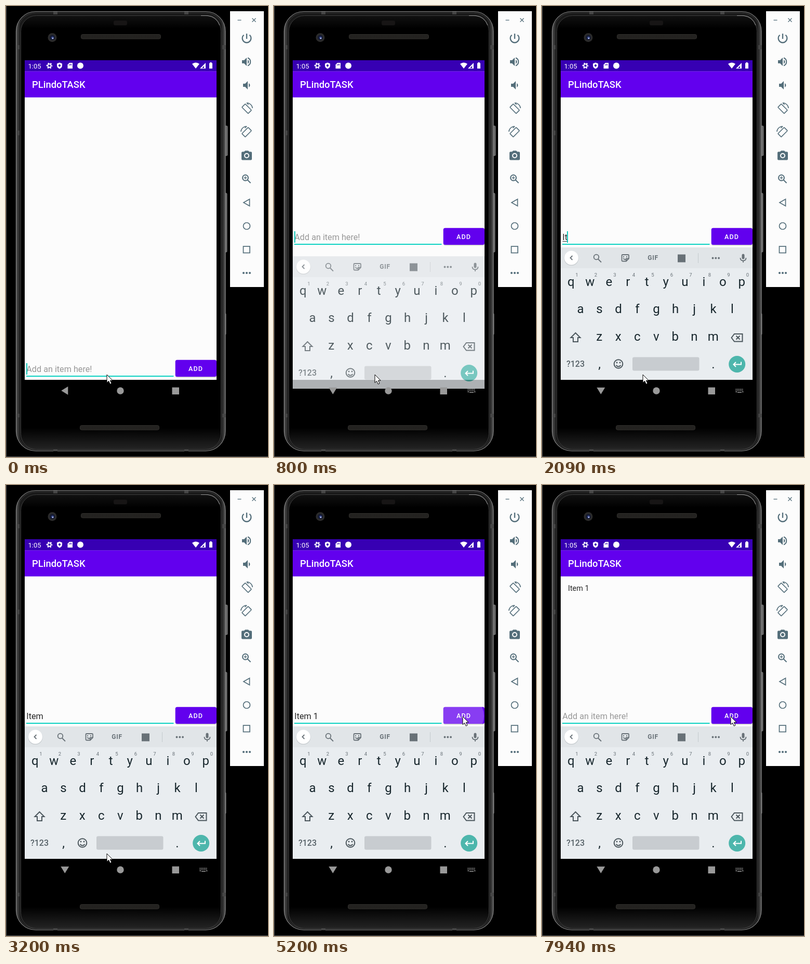
Recreate the animation shown at these times as an HTML page. Size 504 by 865 pixels, loop 8000 ms.

```html
<!DOCTYPE html>
<html lang="en">
<head>
<meta charset="utf-8">
<title>To-do app demo</title>
<style>
html, body { margin: 0; width: 100%; height: 100%; overflow: hidden; background: #000; }
svg { display: block; width: 504px; height: 865px; font-family: Roboto, sans-serif; }
text { white-space: pre; }
.mid { text-anchor: middle; }
.line { fill: none; stroke-width: 2; }
#panel { fill: #546e7a; stroke: #546e7a; stroke-width: 0; }
#panel .line { fill: none; stroke-width: 2; }
#strip { fill: #687177; stroke: #687177; stroke-width: 0; }
#strip .line { fill: none; stroke-width: 1.8; }
</style>
</head>
<body>
<svg viewBox="0 0 504 865">
  <defs>
    <linearGradient id="face" x2="0" y2="1">
      <stop offset="0" stop-color="#111"/><stop offset=".03"/><stop offset=".95"/><stop offset="1" stop-color="#242424"/>
    </linearGradient>
    <linearGradient id="rim">
      <stop offset="0" stop-color="#555"/><stop offset=".02" stop-color="#191919"/>
      <stop offset=".98" stop-color="#191919"/><stop offset="1" stop-color="#555"/>
    </linearGradient>
    <pattern id="mesh" width="3" height="3" patternUnits="userSpaceOnUse">
      <path d="M0 0h3v3h-3z" fill="#1c1b19"/><path d="M0 0h1v1h-1zM1.5 1.5h1v1h-1z" fill="#3b3936"/>
    </pattern>
    <clipPath id="btnClip"><rect x="325.700" y="678.700" width="79.300" height="32.300" rx="3.500"/></clipPath>
    <g id="turn">
      <rect x="-4.500" y="-8.500" width="9" height="17" rx=".8" transform="rotate(-45)"/>
      <path d="M0-11.200A11.200 11.200 0 0 1 11.200-1M0-11.200l3.500 3.500"/>
    </g>
  </defs>

  <rect width="504" height="865"/>
  <path d="M.5 0V864.500H504" fill="none" stroke="#5c5c5c"/>

  <!-- phone body -->
  <g fill="#666" stroke="#909090" stroke-width=".8">
    <rect x="419" y="230" width="7" height="57" rx="1.500"/>
    <rect x="418" y="359" width="7" height="113" rx="1.500"/>
    <rect x="418" y="590" width="5" height="40" rx="1"/>
  </g>
  <rect x="19.500" y="10.500" width="402.500" height="843" rx="38" fill="url(#rim)" stroke="#858585" stroke-width="1.200"/>
  <rect x="22" y="13" width="397.500" height="838" rx="36" fill="none" stroke="#3c3c3c"/>
  <rect x="28.500" y="18.500" width="385" height="832" rx="30" fill="url(#face)" stroke="#3c3c3c"/>
  <path d="M375 18.500H388Q405 20 411 37" fill="none" stroke="#999"/>
  <path d="M20 75h6v8h-6zM20 239h6v9h-6zM416 75h6v8h-6zM20 782h6v7h-6zM416 782h6v7h-6zM91 11h8v5h-8zM343 11h8v5h-8zM91 850h8v4h-8zM343 850h8v4h-8z" fill="#454545"/>
  <rect x="207" y="28" width="26" height="9" rx="3" fill="#171515"/>
  <g fill="url(#mesh)" stroke="#34322f">
    <rect x="144.500" y="54.500" width="153" height="8.500" rx="3"/>
    <rect x="142.500" y="804.500" width="152" height="8.500" rx="3"/>
  </g>
  <circle cx="89" cy="60.500" r="8.500" fill="#2b2b2b"/>
  <circle cx="89" cy="60.500" r="5" fill="#151a30"/>
  <circle cx="89.500" cy="61" r="2.500" fill="#37488c"/>
  <circle cx="90" cy="62" r="1.200" fill="#d4dcf8"/>

  <!-- app -->
  <rect x="36" y="104" width="369" height="613" fill="#fcfcfc"/>
  <rect x="36" y="104" width="369" height="21.500" fill="#3700b3"/>
  <rect x="36" y="125.300" width="369" height="50" fill="#6200ee"/>
  <g fill="#fff">
    <text x="42.500" y="119.500" font-size="13">1:05</text>
    <g transform="translate(83.500 114.500)" stroke="#fff">
      <circle r="3.200" class="line"/>
      <circle r="4.900" fill="none" stroke-width="2" stroke-dasharray="2.500 2.630" stroke-dashoffset="1.250"/>
    </g>
    <path d="M103 108.500l5 2v3.500q0 4.500-5 6.500q-5-2-5-6.500v-3.500z"/>
    <path d="M103 111.500l2.500 2.500l-2.500 3l-2.500-3z" fill="#3700b3"/>
    <path d="M122 109h6v11h-9.500v-7.500z"/>
    <path d="M121.500 112v2M123.500 111v3M125.500 111v3" stroke="#3700b3"/>
    <circle cx="143" cy="114.500" r="6"/>
    <path d="M358 111q7-5 14 0l-7 9z"/>
    <path d="M384 109v11h-11z"/>
    <path d="M381 115v4h-4z" fill="#3700b3"/>
    <path d="M391 109.500h1.500v-1.500h3v1.500h1.500v10.500h-6z"/>
    <text x="50" y="157" font-size="18.400" font-weight="500">PLindoTASK</text>
  </g>
  <text id="entry" x="50" y="202.500" font-size="14.400" fill="#242424">Item 1</text>

  <g id="form">
    <text id="field" x="39.300" y="702.300" font-size="16.200"></text>
    <path id="under" stroke="#333"/>
    <rect id="caret" y="685" width="2" height="22" fill="#13c9bb"/>
    <rect x="39" y="709" width="283.500" height="2" fill="#0cd2c2"/>
    <rect x="326" y="680.500" width="79" height="32" rx="3.500" fill="#000" opacity=".18"/>
    <rect x="325.700" y="678.700" width="79.300" height="32.300" rx="3.500" fill="#6200ee"/>
    <circle id="ripple" cx="363" cy="696" fill="#fff" clip-path="url(#btnClip)"/>
    <text x="351" y="700" font-size="12.600" font-weight="500" letter-spacing="1.120" fill="#fff">ADD</text>
  </g>

  <!-- soft keyboard -->
  <g id="board">
    <rect x="36" y="463" width="369" height="254" fill="#e9edf0"/>
    <rect x="36" y="463" width="369" height="40" fill="#e1e5e8"/>
    <g id="strip">
      <circle cx="56.500" cy="484" r="14" fill="#c8cdd0"/>
      <circle cx="56.500" cy="483" r="13.500" fill="#fff"/>
      <path class="line" d="M58.500 479l-4 4l4 4"/>
      <circle class="line" cx="104.500" cy="481.500" r="4.800"/>
      <path class="line" d="M108 485.500l6 6"/>
      <path class="line" d="M155 477h10.500q1.500 0 1.500 1.500v6l-5 5h-7q-1.500 0-1.500-1.500v-9.500q0-1.500 1.500-1.500zM162 489v-4.500h4.500M156.500 484q2 3 5 2"/>
      <path d="M156 480h2v2h-2zM162 480h2v2h-2z"/>
      <text class="mid" x="213.500" y="487.300" font-size="12" font-weight="700" letter-spacing=".7">GIF</text>
      <rect x="261" y="476.500" width="15" height="15"/>
      <path d="M300 474h1v19h-1z" fill="#c5cace"/>
      <circle cx="328.500" cy="483.500" r="1.900"/><circle cx="334.300" cy="483.500" r="1.900"/><circle cx="340.100" cy="483.500" r="1.900"/>
      <rect x="384.500" y="475.500" width="5" height="10" rx="2.500"/>
      <path class="line" d="M381.500 483q0 5.500 5.500 5.500t5.500-5.500M387 488v4"/>
    </g>
    <g id="keys" class="mid" fill="#17262c" font-size="24"></g>
    <g class="line" stroke="#4b565c" stroke-width="1.800">
      <path d="M64.500 627l9 9h-4.500v8h-9v-8h-4.500z"/>
      <path d="M370 629h15.500v14.500h-15.500l-5.500-7.250zM373.500 632.500l7 7M380.500 632.500l-7 7"/>
      <circle cx="147" cy="686.500" r="8.300"/>
      <path d="M142.500 689q4.500 5 9 0"/>
    </g>
    <circle cx="144" cy="684" r="1.400" fill="#4b565c"/><circle cx="150" cy="684" r="1.400" fill="#4b565c"/>
    <text class="mid" x="64.500" y="692" font-size="16" font-weight="500" fill="#566167">?123</text>
    <rect x="174" y="673.500" width="128.500" height="26" rx="3" fill="#c8ccd0"/>
    <circle cx="375.200" cy="687" r="16" fill="#4db6ac"/>
    <path class="line" d="M383 682.500v5h-14.500M373 683l-4.500 4.500l4.500 4.500" stroke="#fff"/>
  </g>

  <g id="toast">
    <rect x="153.500" y="653.500" width="134" height="42.500" rx="21" fill="#000" opacity=".035"/>
    <rect x="154" y="652.500" width="133" height="42.500" rx="21" fill="#ebedee"/>
    <text x="175" y="678" font-size="12.600" fill="#3a3a3a">Item was added</text>
  </g>

  <!-- navigation bar -->
  <g fill="#999">
    <path id="back" d="M-7 0l13-8v16z"/>
    <circle cx="220" cy="738" r="6.700"/>
    <rect x="319.500" y="731.500" width="13.500" height="13.500"/>
    <g id="ime" fill="none" stroke="#999" stroke-width="1.500" stroke-dasharray="1.500 1">
      <path d="M372.500 735h15M372.500 737.500h15"/><path d="M372.500 740h2.500M385 740h2.500M376 741h8" stroke-dasharray="none"/>
    </g>
  </g>

  <!-- emulator panel -->
  <rect x="431" y="10" width="65" height="529" fill="#fcfcfc"/>
  <g id="panel">
    <path d="M445.500 26.500h7v1.300h-7z"/>
    <path class="line" style="stroke-width:1.400" d="M473.500 23.500l7 7M480.500 23.500l-7 7"/>
    <path class="line" style="stroke-width:2.300" d="M463 53v10M457.500 55.500a8.400 8.400 0 1 0 11 0"/>
    <path d="M454 104h4l5-5v16l-5-5h-4zM465 103q5 4 0 8z"/>
    <path class="line" d="M465 99.500a8 8 0 0 1 0 15"/>
    <path d="M456 149h4l5-5v16l-5-5h-4zM467 148q5 4 0 8z"/>
    <g class="line" style="stroke-width:1.600">
      <use href="#turn" transform="translate(463 197)"/>
      <use href="#turn" transform="translate(463 242) scale(-1 1)"/>
    </g>
    <path d="M460 277.500h6l2 2h3q2 0 2 2v12q0 2-2 2h-16q-2 0-2-2v-12q0-2 2-2h3z"/>
    <circle cx="463" cy="287" r="4" style="fill:#546e7a;stroke:#fcfcfc;stroke-width:2"/>
    <circle class="line" cx="460.500" cy="329.500" r="5.500"/>
    <path class="line" d="M464.500 333.500l6 6"/>
    <path class="line" style="stroke-width:1.300" d="M457.500 329.500h6M460.500 326.500v6"/>
    <path class="line" style="stroke-width:1.700" d="M457 377l11.500-6.500v13z"/>
    <circle class="line" style="stroke-width:1.700" cx="463" cy="422" r="6.500"/>
    <rect class="line" style="stroke-width:1.700" x="456.500" y="461" width="12.500" height="12.500"/>
    <circle cx="457" cy="512" r="2.100"/><circle cx="463" cy="512" r="2.100"/><circle cx="469" cy="512" r="2.100"/>
  </g>

  <path id="mouse" d="M0 0v15.500l3.600-3.300l2.600 6l2.800-1.200l-2.600-5.800h4.700z" fill="#fff" stroke="#000"/>
</svg>
<script>
const $ = id => document.getElementById(id);
const set = (id, attrs) => { for (const k in attrs) $(id).setAttribute(k, attrs[k]); };

function key(ch, x, y, extra = '') {
  return `<text x="${x}" y="${y}" ${extra}>${ch}</text>`;
}
const rows = [['qwertyuiop', 55.8, 537], ['asdfghjkl', 74, 589], ['zxcvbnm', 110.3, 642]];
let keys = key(',', 110.5, 695) + key('.', 329.5, 695);
for (const [letters, x0, y] of rows)
  [...letters].forEach((ch, i) => {
    const x = x0 + i * 36.5;
    keys += key(ch, x, y);
    if (y < 540) keys += key((i + 1) % 10, x + 11.2, 519, 'font-size="9.5" fill="#687177"');
  });
$('keys').innerHTML = keys;

// Each track: [start time, value...]; a value holds until the next start.
const tracks = {
  mouse: [[0, 194, 707], [4320, 203, 690], [4450, 248, 606], [4570, 306, 522], [4680, 347, 462],
    [4800, 362, 434], [5050, 363, 438], [5200, 363, 444]],
  text: [[0, ''], [2090, 'It'], [2240, 'Ite'], [2360, 'Item'], [2640, 'Item '], [3570, 'Item 1'], [5560, '']],
  caret: [[0, 39], [250, -9], [680, 39], [1190, -9], [1690, 39], [2090, 48], [2240, 57], [2360, 71],
    [2640, 75], [3200, -9], [3570, 84], [4070, -9], [4570, 84], [5050, -9], [5560, 39], [6050, -9],
    [6300, 39], [6710, -9], [7270, 39], [7800, -9]],
  under: [[0, 0], [2090, 48.5], [2240, 57.5], [2360, 71.5], [2640, 0]],
  board: [[0, 0, 0], [680, 0.2, 25], [800, 0.75, 17], [930, 1, 0]],
  back: [[0, 0], [250, -45], [370, -90]],
  ripple: [[0, 0, 0], [5200, 41, 0.24], [5450, 60, 0.2], [5560, 60, 0.09], [5690, 0, 0]],
  toast: [[0, 0], [5690, 0.25], [5800, 0.55], [5930, 0.85], [6050, 1], [7550, 0.75], [7680, 0.5],
    [7800, 0.25], [7940, 0]]
};
const at = (name, t) => tracks[name].findLast(s => s[0] <= t).slice(1);

function draw(t) {
  const [mx, my] = at('mouse', t), [text] = at('text', t), [under] = at('under', t), [caret] = at('caret', t);
  const [alpha, drop] = at('board', t), [angle] = at('back', t), [r, glow] = at('ripple', t);
  set('mouse', { transform: `translate(${mx} ${my})` });
  set('form', { transform: `translate(0 ${t < 680 ? 0 : -253})` });
  $('field').textContent = text || 'Add an item here!';
  set('field', { fill: text ? '#242424' : '#989898' });
  set('caret', { x: caret, opacity: +(caret > 0) });
  set('under', { d: under ? `M39.5 704.5H${under}` : '' });
  set('board', { opacity: alpha, transform: `translate(0 ${drop})` });
  set('back', { transform: `translate(113.3 737.7) rotate(${angle})` });
  set('ime', { opacity: t < 250 ? 0 : t < 370 ? 0.5 : 1 });
  set('ripple', { r, opacity: glow });
  set('entry', { opacity: t < 5560 ? 0 : 1 });
  set('toast', { opacity: at('toast', t)[0] });
}
function tick() {
  draw(performance.now() % 8000);
  requestAnimationFrame(tick);
}
tick();
</script>
</body>
</html>
```
